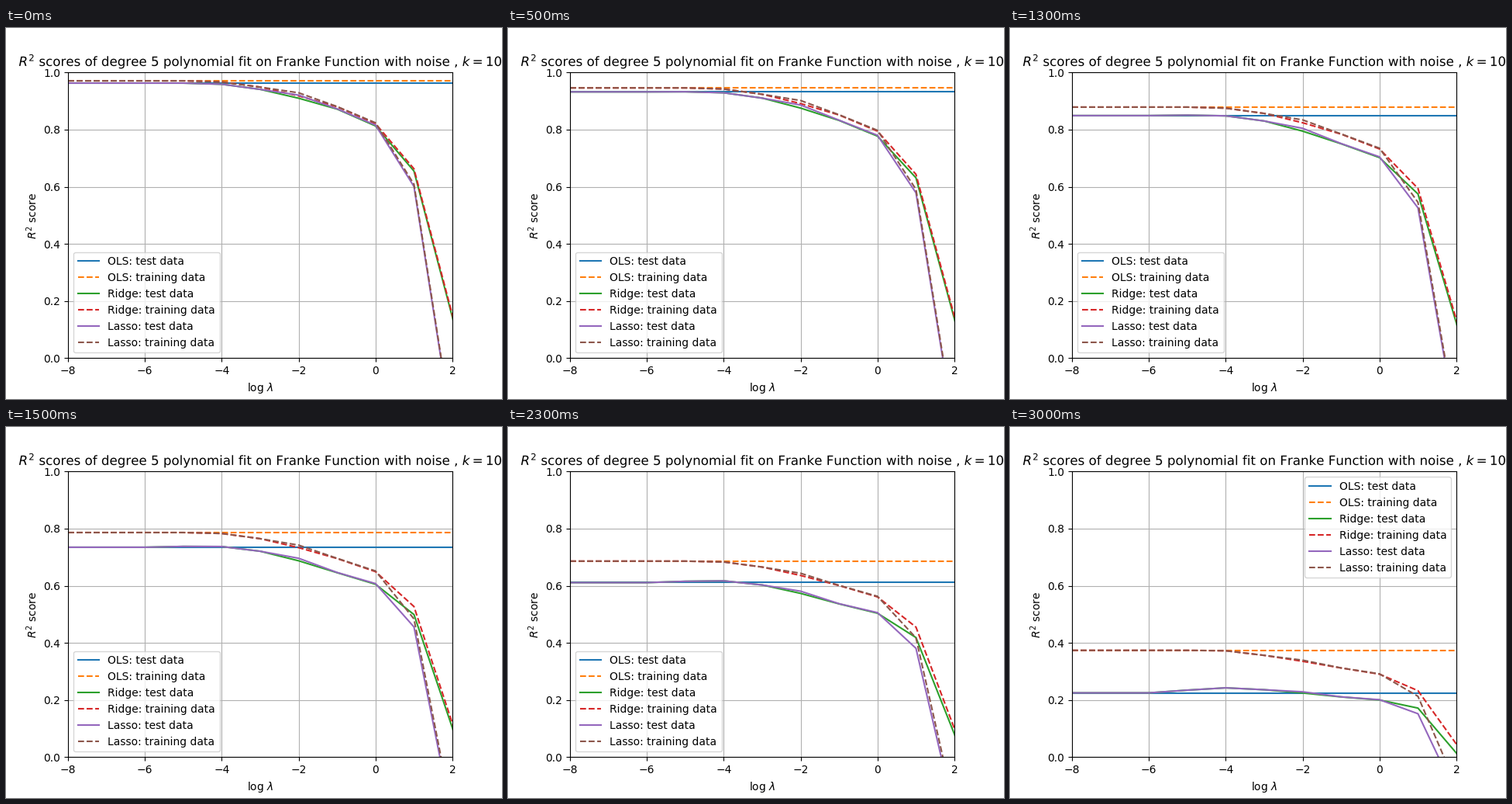
These frames come from a looping animation (640x478 px, 3.5 s). A matplotlib script:

```python
import numpy as np
import matplotlib.pyplot as plt
from matplotlib.animation import FuncAnimation
from matplotlib.patheffects import Normal

W, H, DPI = 640, 478, 100
NOISE = [0, 0.05, 0.1, 0.15, 0.2, 0.3, 0.4]
SIGNAL_VAR = 0.0922
X = np.arange(-8, 4)  # log lambda

# Noise-free loss of score through the penalty, at log lambda = -5 ... 3
RIDGE_LOSS = [0, 0.004, 0.022, 0.053, 0.091, 0.150, 0.308, 0.82, 1.4]
LASSO_LOSS = [0, 0.004, 0.022, 0.042, 0.090, 0.147, 0.362, 1.22, 1.5]

# Noise-free OLS score, share of the noise explained (key points over
# log lambda), and how strongly signal and noise interact
TEST = dict(clean=0.963, knots=[-6, -4, -1, 0, 2],
            share=[-0.2, -0.17, -0.17, -0.153, -0.06], mix=0.12)
TRAIN = dict(clean=0.971, knots=[-4, -1], share=[0.03, -0.015], mix=0.05)

plt.rcParams["text.kerning_factor"] = 6


def score(x, loss, sigma, clean, knots, share, mix):
    """R2 as explained variance over signal plus noise variance."""
    ratio = sigma ** 2 / SIGNAL_VAR
    t = sigma / NOISE[-1]
    cross = mix * t * (1 - t) * np.exp(-((x + 0.7) / 1.5) ** 2)
    explained = clean - loss + ratio * np.interp(x, knots, share) - cross
    return explained / (1 + ratio)


def curves(sigma):
    penalties = {
        "OLS": (np.full(len(X), X[0]), 0),
        "Ridge": (X, np.interp(X, np.arange(-5, 4), RIDGE_LOSS)),
        "Lasso": (X, np.interp(X, np.arange(-5, 4), LASSO_LOSS)),
    }
    for name, (x, loss) in penalties.items():
        yield f"{name}: test data", "-", score(x, loss, sigma, **TEST)
        yield f"{name}: training data", "--", score(x, loss, sigma, **TRAIN)


fig, ax = plt.subplots(figsize=(W / DPI, H / DPI), dpi=DPI)


def draw(i):
    ax.clear()
    for label, style, y in curves(NOISE[i]):
        ax.plot(X, y, style, label=label)
    ax.set(xlim=(-8, 2), ylim=(0, 1), xlabel=r"log $\lambda$", ylabel="$R^2$ score")
    # Drawn as outlines, so that hinting does not change the letter height
    ax.set_title("$R^2$ scores of degree 5 polynomial fit on "
                 "Franke Function with noise , $k=10$", path_effects=[Normal()])
    ax.grid(True)
    ax.legend(loc="lower left" if NOISE[i] < 0.25 else "upper right")
    return ax.lines


anim = FuncAnimation(fig, draw, frames=len(NOISE), interval=500,
                     init_func=lambda: draw(0), repeat=True)
plt.show()
```
